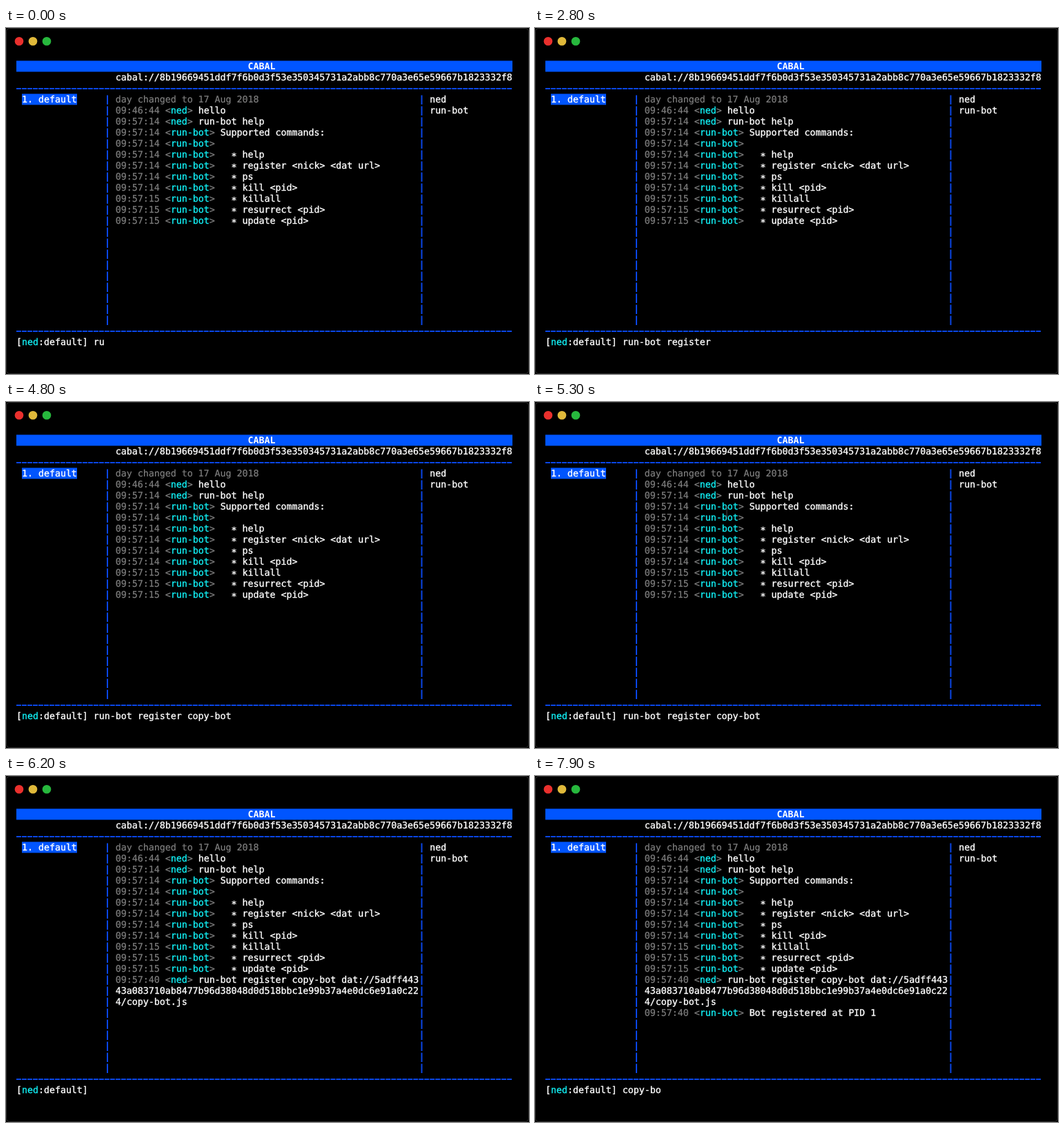
An HTML page that plays this animation: 758x502 px, repeating every 8 s.

```html
<!DOCTYPE html>
<html lang="en">
<head>
<meta charset="utf-8">
<title>Terminal chat</title>
<style>
html, body { margin: 0; width: 100%; height: 100%; overflow: hidden; background: #000; }
svg { display: block; }
text {
  font: 13.27px "DejaVu Sans Mono", monospace;
  white-space: pre;
  text-rendering: geometricPrecision;
  fill: #fff;
  stroke: #fff;
  stroke-width: .35;
}
.dim { fill: #808080; stroke: #808080; stroke-width: .2; }
.nick { fill: #12f0f5; stroke: #12f0f5; }
.bold { font-weight: bold; stroke: none; }
.rule { stroke: #0a46e6; stroke-width: 2; stroke-dasharray: 7 .99; }
.bar { stroke: #0a46e6; stroke-width: 2; stroke-dasharray: 13.5 2.5; }
</style>
</head>
<body>
<svg id="stage" width="758" height="502" viewBox="0 0 758 502">
  <rect x=".5" y=".5" width="757" height="501" rx="5" stroke="#2c2c2c"/>
  <circle cx="19" cy="19.300" r="6.300" fill="#ea302d"/>
  <circle cx="39" cy="19.300" r="6.300" fill="#e0b93a"/>
  <circle cx="59" cy="19.300" r="6.300" fill="#27b83d"/>
  <rect x="15" y="47.500" width="719" height="16" fill="#0055ff"/>
  <rect x="23" y="95.500" width="80" height="16" fill="#0055ff"/>
  <path class="rule" d="M15 88H734M15 440H734"/>
  <path class="bar" d="M147 97.500V432M602.500 97.500V432"/>
  <path id="pointer" d="M275.500 151.500q2.500 0 2.500 2v11q0 2-2.500 2M280.500 151.500q-2.500 0-2.500 2M278 164.500q0 2 2.500 2" fill="none" stroke="#4a4a4a"/>
</svg>
<script>
const NS = 'http://www.w3.org/2000/svg';
const stage = document.getElementById('stage');
const pointer = document.getElementById('pointer');
const CELL = 7.99, LINE = 16, COLS = 90, LOOP = 8000;
const user = 'ned', bot = 'run-bot', newBot = 'copy-bot';
const datUrl = 'dat://5adff44343a083710ab8477b96d38048d0d518bbc1e9' +
  `9b37a4e0dc6e91a0c224/${newBot}.js`;
const command = `${bot} register ${newBot} ${datUrl}`;

function put(col, row, str, cls = '') {
  const el = document.createElementNS(NS, 'text');
  el.setAttribute('x', 15 + col * CELL);
  el.setAttribute('y', 60.3 + row * LINE);
  el.setAttribute('class', cls);
  el.textContent = str;
  stage.insertBefore(el, pointer);
  return el;
}

// One chat message, wrapped to the 55 columns of the middle pane.
function message(row, time, nick, body) {
  const start = 18 + time.length + 2, after = start + nick.length;
  const room = 73 - after - 2;
  const parts = [
    put(18, row, time + ' <', 'dim'),
    put(start, row, nick, 'nick'),
    put(after, row, '>', 'dim'),
    put(after + 2, row, body.slice(0, room))
  ];
  for (let i = room; i < body.length; i += 55)
    parts.push(put(18, ++row, body.slice(i, i + 55)));
  return parts;
}

put(42, 0, 'CABAL', 'bold');
put(18, 1, 'cabal://8b19669451ddf7f6b0d3f53e350345731a2abb8c770a3e65e59667b1823332f8');
put(1, 3, '1. default');
put(75, 3, user);
put(75, 4, bot);

put(18, 3, 'day changed to 17 Aug 2018', 'dim');
message(4, '09:46:44', user, 'hello');
message(5, '09:57:14', user, bot + ' help');
['Supported commands:', '', '  ∗ help', '  ∗ register <nick> <dat url>', '  ∗ ps',
  '  ∗ kill <pid>', '  ∗ killall', '  ∗ resurrect <pid>', '  ∗ update <pid>']
  .forEach((body, i) => message(6 + i, i < 6 ? '09:57:14' : '09:57:15', bot, body));
const sent = message(15, '09:57:40', user, command);
const reply = message(18, '09:57:40', bot, 'Bot registered at PID 1');

put(0, 25, '[');
put(1, 25, user, 'nick');
put(4, 25, ':default]');
const input = put(14, 25, ''), overflow = put(0, 26, '');

// [time, characters typed]
const typing = [[0, 2], [100, 3], [600, 4], [700, 5], [800, 6], [900, 7],
  [1800, 9], [2100, 10], [2300, 11], [2400, 12], [2500, 13], [2600, 14], [2700, 15], [2800, 16],
  [3300, 18], [3400, 20], [3500, 21], [3700, 22], [3800, 23], [3900, 25],
  [5600, command.length], [6200, 0],
  [7200, 1], [7400, 2], [7500, 3], [7600, 5], [7900, 7]];

const show = (el, on) => el.setAttribute('visibility', on ? 'visible' : 'hidden');

function draw(t) {
  const count = typing.findLast(step => step[0] <= t)[1];
  const typed = (t < 6200 ? command : newBot).slice(0, count);
  input.textContent = typed.slice(0, COLS - 14);
  overflow.textContent = typed.slice(COLS - 14);
  show(pointer, t >= 4800 && t < 6200);
  sent.forEach(el => show(el, t >= 6200));
  reply.forEach(el => show(el, t >= 6300));
}

const begin = performance.now();
function frame() {
  draw((performance.now() - begin) % LOOP);
  requestAnimationFrame(frame);
}
frame();
</script>
</body>
</html>
```
